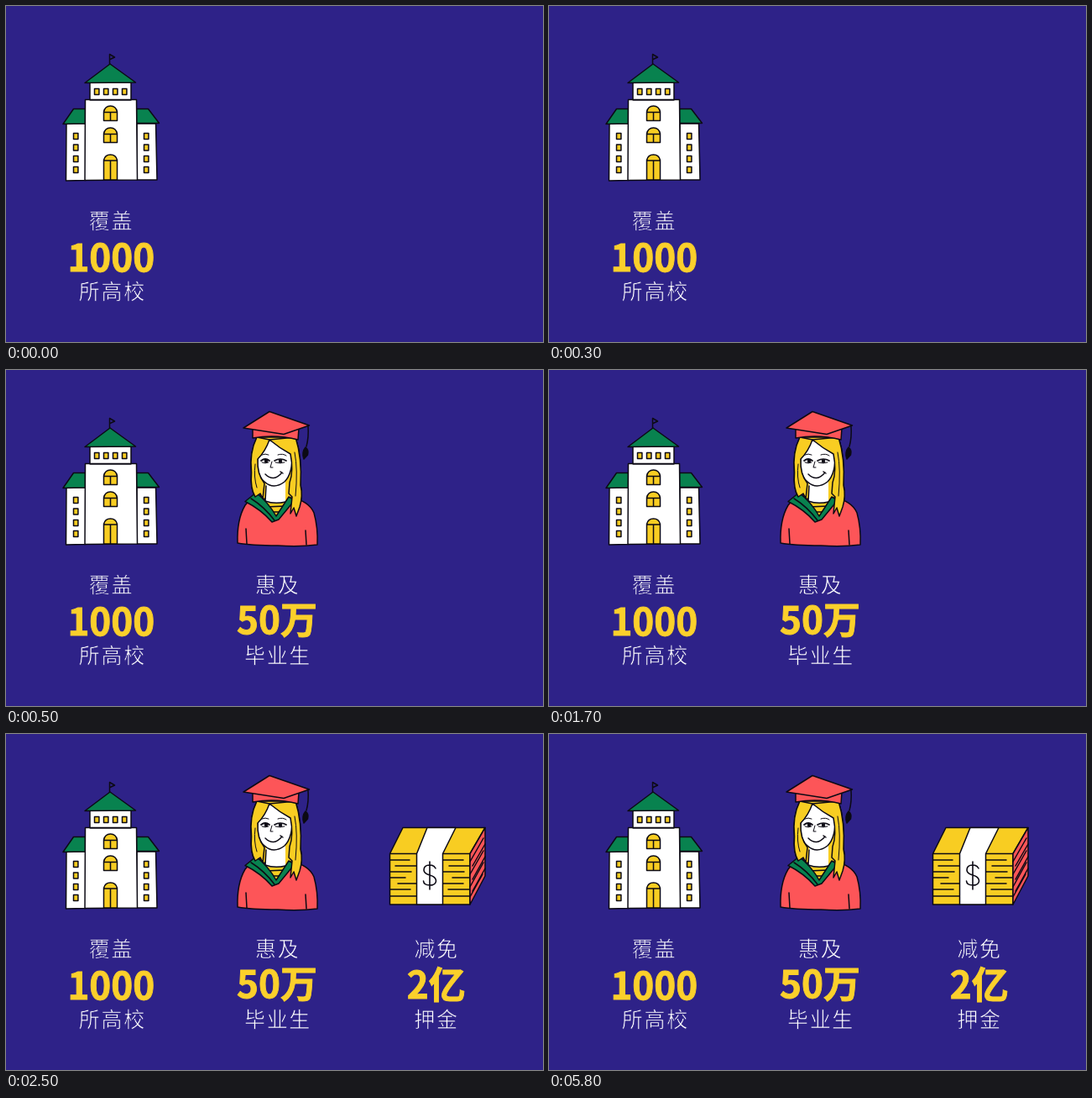
Animation, 640 px wide and 400 px high, one loop 8 s. Source, as an HTML page:

```html
<!DOCTYPE html>
<html lang="zh-CN">
<head>
<meta charset="utf-8">
<title>覆盖高校</title>
<style>
  html, body { margin: 0; width: 100%; height: 100%; overflow: hidden; background: #2e2288; }
  svg { display: block; width: 100vw; height: 100vh; }
  .art { stroke: #0c0a14; stroke-width: 1.5; stroke-linejoin: round; stroke-linecap: round; fill: none; }
  .white { fill: #fff; }
  .green { fill: #08824f; }
  .gold { fill: #f8cd22; }
  .red { fill: #fd5558; }
  .ink { fill: #0c0a14; }
  text { font-family: "Noto Sans CJK SC", "Noto Sans CJK", "Noto Sans SC", sans-serif; text-anchor: middle; }
  /* A background-coloured outline thins the strokes to a light weight. */
  .label { font-size: 25px; font-weight: 300; letter-spacing: 1.7px; fill: #fff; stroke: #2e2288; stroke-width: .65px; }
  .figure { font-size: 44px; font-weight: 700; fill: #fbd02b; stroke: #fbd02b; stroke-width: .9px; }
  #graduates { animation: second 8s step-end infinite; }
  #savings { animation: third 8s step-end infinite; }
  @keyframes second { 0% { visibility: hidden; } 6.25%, 100% { visibility: visible; } }
  @keyframes third { 0% { visibility: hidden; } 31.25%, 100% { visibility: visible; } }
</style>
</head>
<body>
<svg viewBox="0 0 640 400">
  <defs>
    <path id="arch" class="gold" d="M116.5 136.5V126Q118 119 124.5 119T132.5 126V136.5ZM116.5 126.5H132.5M124.5 126.5V136.5"/>
    <rect id="pane" class="gold" width="5.4" height="7"/>
    <g id="column">
      <use href="#pane" y="151.5"/><use href="#pane" y="165"/>
      <use href="#pane" y="178.5"/><use href="#pane" y="191.5"/>
    </g>
  </defs>

  <g id="schools">
    <g class="art">
      <path class="white" d="M72 140H95V207.5L71.5 208ZM156 140H178.5L180 207H156Z"/>
      <path class="green" d="M80.5 122.5H94.5V140L68 140.5ZM155.5 122.5H169.5L182.5 139.5H155.5Z"/>
      <path class="white" d="M100 91H149V112H100ZM94.5 111.5H155.5L156.5 207L94 207.5Z"/>
      <path class="green" d="M124 69L154.5 91L94 91.5Z"/>
      <path d="M123.5 69V57.5L129.5 61L124 63.5"/>
      <use href="#pane" x="105.5" y="98.5"/><use href="#pane" x="116.5" y="98.5"/>
      <use href="#pane" x="127.5" y="98.5"/><use href="#pane" x="138.5" y="98.5"/>
      <use href="#column" x="80.5"/><use href="#column" x="164.5"/>
      <use href="#arch"/><use href="#arch" y="26"/>
      <path class="gold" d="M116.5 207V183.5Q118 177 124.5 177T132.5 183.5V207ZM116.5 184H132.5M124.5 184V207"/>
    </g>
    <text class="label" x="125.4" y="264.5">覆盖</text>
    <text class="figure" x="125.3" y="315.5">1000</text>
    <text class="label" x="126.8" y="348.5">所高校</text>
  </g>

  <g id="graduates">
    <g class="art">
      <path class="gold" d="M299 80Q290 98 292.5 122Q291 141 297 151L303 147L306 153L336 158L339 171L343 164L346 174L350 163Q354 150 351 137Q353 105 345 80Z"/>
      <path class="red" d="M276 206Q275 178 285 161Q291 153 302 150L321 178L340 152Q361 156 367 170Q372 188 371 208Q349 211 324 209Q292 209 276 206Z"/>
      <path d="M287 207L286 189M358 208L357 191"/>
      <path class="gold" d="M307 156Q322 160 337 156L336 163L321 176Z"/>
      <path d="M310 163L333 162M315 169H328"/>
      <path class="white" stroke="none" d="M310 132L309 157Q320 160 333 157L333 130Z"/>
      <path d="M310 138L309 156Q320 160 333 157"/>
      <path class="green" d="M298 146L285 156.5Q304 166 317 181L325 178L344 155L337 151L322 174Q313 158 298 146Z"/>
      <path d="M292 153Q308 163 320 179"/>
      <path class="white" d="M302 96Q295 122 308 133Q319 143 332 133Q342 123 341 99L330 84H311Z"/>
      <path class="gold" d="M299 80Q290 98 292.5 122Q291 141 297 151L303 147L306 153L308 135Q299 124 300 106Q309 97 314 83Z"/>
      <path class="gold" d="M314 83Q326 93 339 100Q343 120 338 134L337 147L341 151L339 171L343 164L346 174L350 163Q354 150 351 137Q353 105 345 80Z"/>
      <path d="M297 112Q295 128 299 140M344 98Q348 118 345 150" stroke-width="1"/>
      <path d="M305 101Q309 99 313 101M324 101Q330 99 334 102" stroke-width="1"/>
      <path d="M304 108Q309 104 314 108M320 108Q327 104 334 108" stroke-width="1.7"/>
      <path d="M305 110Q309 112 313 110M321 110Q327 112 332 110M317 109L315 116H318" stroke-width="1"/>
      <g class="ink" stroke="none"><circle cx="310" cy="108.5" r="2.2"/><circle cx="327" cy="108.5" r="2.2"/></g>
      <path d="M309 124Q319 134 329 122M327 121L330 123"/>
      <path class="red" d="M294 69L294 81Q321 76 348 83L349 69Z"/>
      <path class="red" d="M314 49.5L361.5 66L331 76.5L283 69Z"/>
      <path d="M360 67Q361 80 358 91"/>
      <path class="ink" d="M357 92Q361 95 359.5 101L355 106Q352 98 357 92Z"/>
    </g>
    <text class="label" x="323.7" y="264.5">惠及</text>
    <text class="figure" x="323" y="314">50万</text>
    <text class="label" x="324" y="348.5">毕业生</text>
  </g>

  <g id="savings">
    <g class="art">
      <path class="gold" d="M473 111.5H571L553 142.5H457.5ZM457.5 142.5H553V203H457.5Z"/>
      <path class="red" d="M571 111.5L553 142.5V203L571 169Z"/>
      <path d="M553 152L569 124M556 157L571 131M553 167L569 139M556 173L571 146M553 182L569 153M556 187L571 160M553 194L568 167"/>
      <path class="white" d="M502 111.5H536L520.5 142.5V203H489.5V142.5Z"/>
      <path d="M458 150H481M464 157H489M458 164H483M458 171H476M467 178H489M458 185H482M458 193H489M521 150H545M528 157H552M521 164H546M532 171H552M521 178H545M527 185H552M521 193H552"/>
      <path d="M512 160Q510 156 505 156Q498 156 498 162Q498 166 505 168Q512.5 170 512.5 175Q512 180 505 180Q498 180 497.5 175M505 152V185" stroke-width="1.6"/>
    </g>
    <text class="label" x="513.1" y="264.5">减免</text>
    <text class="figure" x="512.8" y="314.5">2亿</text>
    <text class="label" x="513" y="348.5">押金</text>
  </g>
</svg>
</body>
</html>
```
